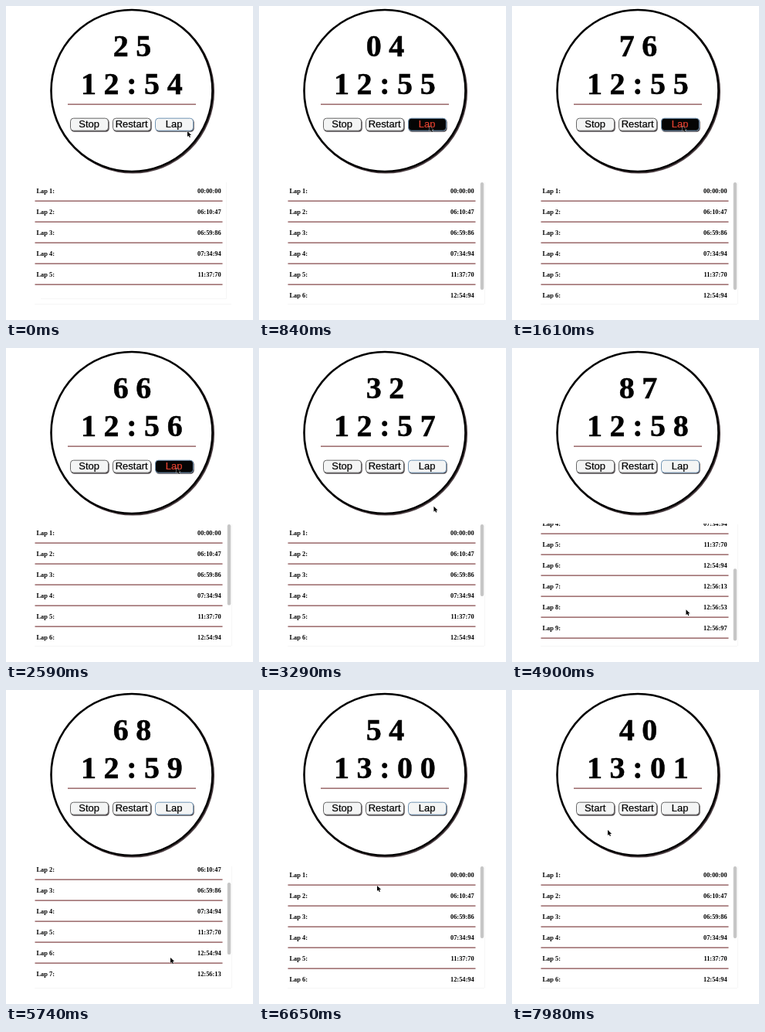
An HTML page for the animation above (8000 ms loop, 320 px wide and 406 px high).

```html
<!DOCTYPE html>
<html lang="en">
<head>
<meta charset="utf-8">
<title>Stopwatch</title>
<style>
  html, body { margin: 0; width: 100%; height: 100%; overflow: hidden; background: #fff; }
  svg { display: block; width: 320px; height: 406px; }
  .big { font: bold 40px "Liberation Serif", Times, serif; letter-spacing: 9.6px; stroke: #000; stroke-width: .5; }
  .lap { font: bold 8.4px "Liberation Serif", Times, serif; }
  .btn text { font: 13px "Liberation Sans", Arial, sans-serif; text-anchor: middle; stroke: #000; stroke-width: .2; }
  .btn .face { fill: #f4f5f5; stroke: #666; }
  .btn.focus .face { stroke: #7295b5; }
  .btn.hover .face { fill: #050505; }
  .btn.hover text { fill: #e2402f; stroke: #e2402f; }
  .end { text-anchor: end; }
  .rule { stroke: #85484a; stroke-width: 1.3; }
  .faint { fill: none; stroke: #f6f6f6; }
</style>
</head>
<body>
<svg viewBox="0 0 320 406">
  <defs><clipPath id="view"><rect x="36" y="227" width="250" height="151.5"/></clipPath></defs>
  <circle cx="164.3" cy="110.8" r="104.5" fill="none" stroke="#4a3c40" stroke-width="2.5"/>
  <circle cx="163" cy="109.5" r="104.5" fill="#fff" stroke="#000" stroke-width="2.6"/>
  <text id="hund" class="big" x="138.7" y="65"></text>
  <text id="secs" class="big" x="97" y="113.5"></text>
  <path class="rule" d="M80 127.2H246"/>
  <g id="buttons"></g>
  <path id="edge" class="faint"/>
  <path class="faint" d="M37 385.5H292"/>
  <g clip-path="url(#view)"><g id="list"></g></g>
  <rect id="thumb" x="286.8" width="4.4" rx="2.2" fill="#c6c6c6"/>
  <path id="cursor" d="M0 0V7L1.6 5.5L2.8 8L4 7.4L2.9 5H5.1Z" fill="#000" stroke="#fff" stroke-width=".7" paint-order="stroke"/>
</svg>
<script>
const LOOP = 8000, STEP = 70, STOP_AT = 7560, VIEW = 151, ROW = 27;
const $ = id => document.getElementById(id);

// [time, hundredths after 12:54:00]
const clock = [[0, 25], [1610, 176], [2590, 266], [3920, 392], [5740, 568], [STOP_AT, 740]];
// [time, x, y]
const pointer = [
  [0, 235, 162], [210, 249, 161], [490, 221, 155], [3150, 221, 155], [3640, 240, 329], [3920, 240, 329],
  [5740, 213, 346], [6510, 213, 337], [6650, 153, 253], [6930, 113, 181],
  [7140, 113, 156], [7630, 113, 156], [7840, 124, 181]
];
const laps = [
  '00:00:00', '06:10:47', '06:59:86', '07:34:94', '11:37:70',
  '12:54:94', '12:56:13', '12:56:53', '12:56:97'
];
const buttons = ['Stop', 'Restart', 'Lap'];
const left = i => 83 + 55 * i;

function at(keys, t, col = 1) {
  const i = keys.findIndex(k => k[0] > t);
  if (i < 0) return keys[keys.length - 1][col];
  const a = keys[i - 1], b = keys[i];
  return a[col] + (b[col] - a[col]) * (t - a[0]) / (b[0] - a[0]);
}

function ease(t, from, to) {
  const u = Math.min(1, Math.max(0, (t - from) / (to - from)));
  return u * u * (3 - 2 * u);
}

const pad = n => String(n).padStart(2, '0');

$('buttons').innerHTML = buttons.map((label, i) => `<g class="btn">
  <rect x="${left(i) + 1}" y="146" width="49.7" height="16.7" rx="4.5" fill="#4b4448"/>
  <rect class="face" x="${left(i) + .5}" y="145.2" width="49" height="16" rx="4"/>
  <text x="${left(i) + 24.7}" y="157.4">${label}</text></g>`).join('');
const btns = [...$('buttons').children];

$('list').innerHTML = laps.map((time, i) => {
  const y = 226 + i * ROW;
  return `<g class="lap"><text x="39.5" y="${y + 16}">Lap ${i + 1}:</text>
    <text class="end" x="278.7" y="${y + 16}">${time}</text>
    <path class="rule" d="M37.5 ${y + 26.2}H280.5"/></g>`;
}).join('');
const rows = [...$('list').children];

function draw(time) {
  const t = Math.floor(time / STEP) * STEP;

  const c = Math.round(at(clock, t)), s = 12 * 60 + 54 + Math.floor(c / 100);
  const hund = pad(c % 100), secs = pad(Math.floor(s / 60)) + ':' + pad(s % 60);
  $('hund').textContent = hund;
  $('secs').textContent = secs;

  // A lap is listed once the clock has reached it
  const count = laps.filter(lap => lap <= secs + ':' + hund).length;
  rows.forEach((row, i) => row.style.display = i < count ? '' : 'none');
  const height = count * ROW + 2, bar = height > VIEW;
  const top = 93 * (ease(t, 3820, 4480) - ease(t, 5320, 6032));
  $('list').setAttribute('transform', `translate(0 ${-top})`);
  $('thumb').style.display = bar ? '' : 'none';
  $('thumb').setAttribute('y', 228 + top * VIEW / height);
  $('thumb').setAttribute('height', VIEW * VIEW / height);
  $('edge').setAttribute('d', bar ? 'M292.5 228V385' : 'M285.5 228V378.5H45');

  const x = at(pointer, t), y = at(pointer, t, 2), stopped = t >= STOP_AT;
  $('cursor').setAttribute('transform', `translate(${x} ${y})`);
  btns.forEach((b, i) => {
    b.classList.toggle('hover', x > left(i) && x < left(i) + 50 && y > 145 && y < 162);
    b.classList.toggle('focus', i === 2 && !stopped);
  });
  btns[0].querySelector('text').textContent = stopped ? 'Start' : 'Stop';
}

const start = performance.now();
function frame(now) {
  draw(Math.max(0, now - start) % LOOP);
  requestAnimationFrame(frame);
}
draw(0);
requestAnimationFrame(frame);
</script>
</body>
</html>
```
